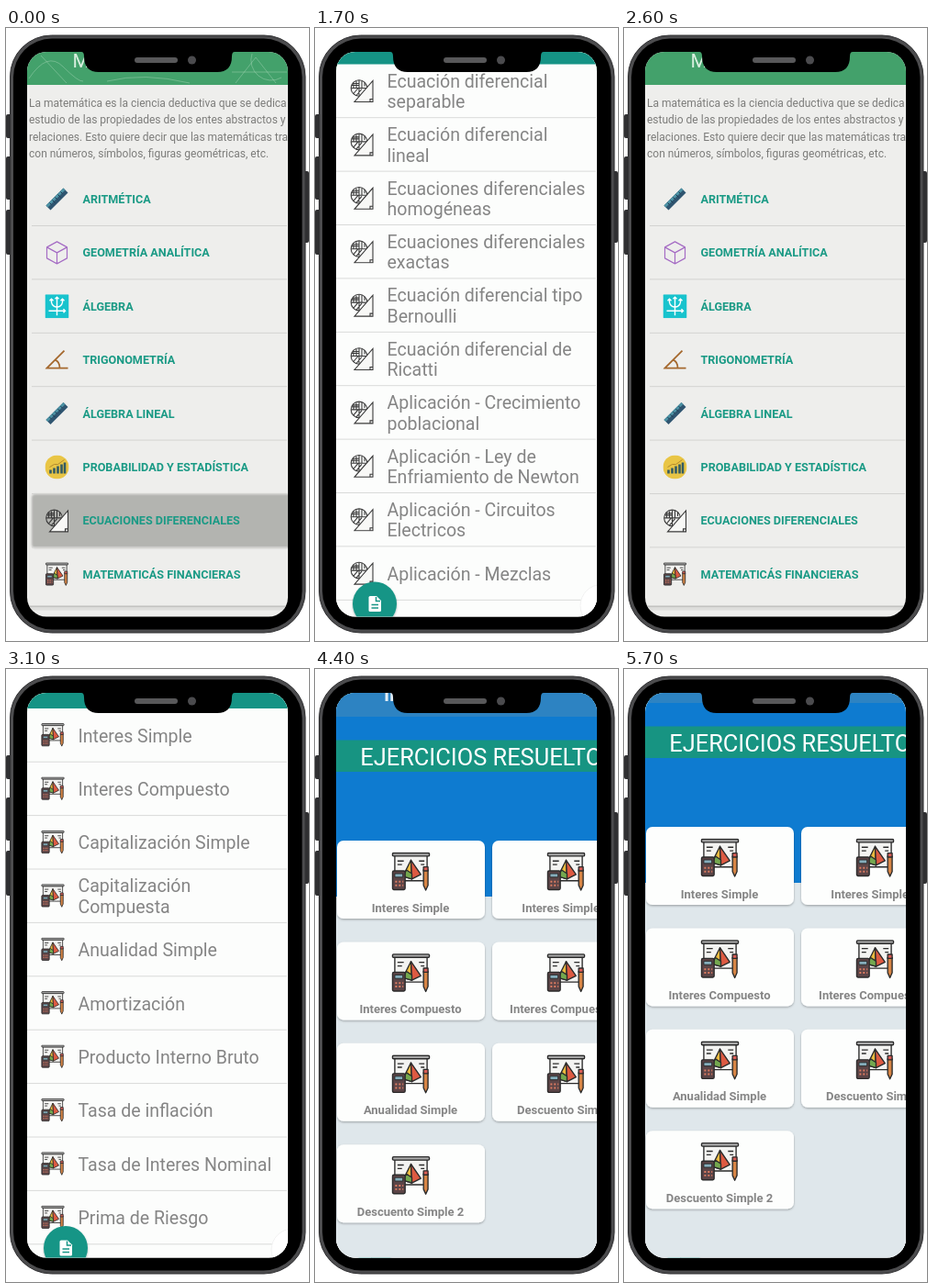
Animation of 330 by 668 pixels, one loop 5.9 s. Source, as an HTML page:

```html
<!DOCTYPE html>
<html lang="es">
<head>
<meta charset="utf-8">
<title>Matemáticas</title>
<style>
  html, body { margin: 0; width: 100%; height: 100%; overflow: hidden; background: #fff; }
  svg { display: block; }
  svg text { font-family: Roboto, Arial, sans-serif; }
  .intro { font-size: 12px; fill: #7c7c7a; }
  .topic { font-size: 12.6px; font-weight: 700; fill: #1a9a85; }
  .item { font-size: 19.55px; fill: #858585; }
  .label { font-size: 13px; font-weight: 700; fill: #858585; text-anchor: middle; }
  .title { font-size: 21px; }
  .banner { font-size: 25.4px; fill: #fff; }
</style>
</head>
<body>
<svg width="330" height="668" viewBox="0 0 330 668">
  <defs>
    <clipPath id="screen">
      <rect x="23" y="26" width="284" height="615.500" rx="21"/>
    </clipPath>
    <filter id="soft" x="-20%" y="-20%" width="140%" height="150%">
      <feDropShadow dx="0" dy="1.2" stdDeviation="1.2" flood-color="#000" flood-opacity=".3"/>
    </filter>
    <filter id="blur"><feGaussianBlur stdDeviation="1.2"/></filter>

    <symbol id="ruler" viewBox="0 0 26 26">
      <path d="M1 20L20 1L25 6L6 25Z" fill="#2f5570"/>
      <path d="M1 20L20 1L22 3L3 22Z" fill="#4d93a5"/>
      <path d="M5 17l2 2M8 14l3 3M11 11l2 2M14 8l3 3M17 5l2 2" stroke="#1c3850"/>
    </symbol>
    <symbol id="cube" viewBox="0 0 26 26">
      <path d="M13 1L24 7V19L13 25L2 19V7ZM2 7L13 13L24 7M13 13V25" fill="none" stroke="#a56cc4" stroke-width="1.2" stroke-linejoin="round"/>
    </symbol>
    <symbol id="axes" viewBox="0 0 26 26">
      <rect width="26" height="26" rx="1" fill="#18c3cd"/>
      <path d="M13 3V23M4 18H22M7 5Q6 13 13 14Q20 13 19 5M11 5L13 3L15 5M20 16L22 18L20 20M5 7L7 5L9 7M17 7L19 5L21 7" fill="none" stroke="#fff" stroke-width="1.4"/>
    </symbol>
    <symbol id="angle" viewBox="0 0 26 26">
      <path d="M21 3L2 22H25M11 13Q16 15 16 22" fill="none" stroke="#a5692f" stroke-width="1.8"/>
    </symbol>
    <symbol id="stats" viewBox="0 0 26 26">
      <circle cx="13" cy="13" r="13" fill="#e9c545"/>
      <path d="M6 20V16M10 20V14M14 20V12M18 20V10M21.5 20V8" stroke="#345b62" stroke-width="2.6"/>
      <path d="M5 13L10 10L14 10L21 5" fill="none" stroke="#b48b2d"/>
    </symbol>
    <symbol id="geo" viewBox="0 0 26 26">
      <g fill="none" stroke="#3a3a3a" stroke-width="1.1">
        <circle cx="10" cy="10" r="8.8"/>
        <path d="M1.500 10H18M10 1.500V18M4 4.500V10M7 2.500V10M2 7H10M3 5H10M13 2V10M16 4V8M4 16L9 10M7 18L13 11"/>
        <path d="M25 2V25H5Z" fill="#f8f8f6"/>
        <path d="M22 25V22H25"/>
      </g>
    </symbol>
    <symbol id="board" viewBox="0 0 44 44">
      <g stroke="#2b2b2b" stroke-width="1.4" stroke-linejoin="round">
        <path d="M4 4H40V32H4Z" fill="#f3f3f1"/>
        <rect x="1.500" y="1" width="41" height="3.500" rx="1" fill="#a9a9a9"/>
        <path d="M22 9L13 27L23 30Z" fill="#e9b93f"/>
        <path d="M22 9L23 30L33 25Z" fill="#dd5a42"/>
        <path d="M17 20L23 24L23 30L13 27Z" fill="#74a84f"/>
        <path d="M7 10h7M7 14h5M31 10h6M33 14h4" fill="none"/>
        <rect x="1.500" y="21" width="14" height="21" rx="1.500" fill="#5c4547"/>
        <rect x="4" y="24" width="9" height="4" fill="#85aebc" stroke-width="1"/>
        <path d="M36 20H41V37L38.500 42.500L36 37Z" fill="#d78545"/>
        <path d="M36 21V16.500H41V21Z" fill="#d95d56"/>
      </g>
      <path d="M4.500 33h2m2 0h2m2 0h1M4.500 37h2m2 0h2m2 0h1" stroke="#dd7c62" stroke-width="2"/>
    </symbol>
    <g id="fab">
      <circle cx="312" cy="627" r="23" fill="#fff" stroke="#f1f1f1"/>
      <circle cx="65" cy="625" r="24" fill="#179586" filter="url(#soft)"/>
      <path d="M60 616.500H67L72 621.500V632Q72 633.500 70.500 633.500H60Q58.500 633.500 58.500 632V618Q58.500 616.500 60 616.500Z" fill="#fff"/>
      <path d="M66.500 617.500V622H71M61.500 626H69M61.500 629.500H69" fill="none" stroke="#179586" stroke-width="1.5"/>
    </g>
  </defs>

  <g fill="#303032">
    <rect y="94" width="8" height="26" rx="2"/>
    <rect y="140" width="8" height="47" rx="2"/>
    <rect y="198" width="8" height="49" rx="2"/>
    <rect x="322" y="156" width="8" height="78" rx="2"/>
  </g>
  <rect x="4.500" y="8" width="321.500" height="651" rx="45" fill="#4c4c4e" stroke="#2e2e30"/>
  <rect x="8" y="11.500" width="314.500" height="644" rx="42"/>

  <g clip-path="url(#screen)">
    <g id="home">
      <rect width="330" height="668" fill="#eeeeec"/>
      <rect width="330" height="62" fill="#43a16b"/>
      <path id="doodles" d="M25 55Q45 25 62 42T84 58M38 30L66 60M250 60L272 32L294 60M246 48H306M268 28A22 22 0 0 0 300 54M110 58Q150 48 200 60" fill="none" stroke="#b4dcc0" stroke-opacity=".4"/>
      <text class="title" x="72.500" y="43" fill="#d9efdf">Matemáticas</text>
      <rect id="press" x="28" width="300" height="58.400" rx="4" fill="#b3b4b0" filter="url(#blur)"/>
    </g>
    <g id="equations"></g>
    <g id="finance"></g>
    <g id="exercises">
      <rect y="-60" width="330" height="740" fill="#dfe7eb"/>
      <rect y="-60" width="330" height="293" fill="#0e7bd0"/>
      <rect y="-60" width="330" height="97" fill="#2d83c2"/>
      <text class="title" x="75" y="19.500" fill="#e4eef6" font-weight="700">Inicio</text>
      <rect y="62.500" width="330" height="34.500" fill="#179482"/>
      <text class="banner" x="49.300" y="89.500">EJERCICIOS RESUELTOS</text>
    </g>
  </g>

  <path d="M82 20V26Q85 26 85 31Q85 48 101 48H230Q246 48 246 31Q246 26 249 26V20Z"/>
  <rect x="140" y="32" width="47" height="6" rx="3" fill="#58585a"/>
  <circle cx="202.500" cy="35" r="4.500" fill="#4b4b4e"/>
</svg>
<script>
const LOOP = 5900, STEP = 100, PITCH = 58.4;
const $ = id => document.getElementById(id);
const add = (id, markup) => $(id).insertAdjacentHTML('beforeend', markup);

const text = (cls, x, y, s) => `<text class="${cls}" x="${x}" y="${y}">${s}</text>`;
const icon = (name, cx, cy, size) =>
  `<use href="#${name}" x="${cx - size / 2}" y="${cy - size / 2}" width="${size}" height="${size}"/>`;
const rule = (x, y, color) => `<path d="M${x} ${y}H306" stroke="${color}"/>`;

const intro = [
  'La matemática es la ciencia deductiva que se dedica al',
  'estudio de las propiedades de los entes abstractos y sus',
  'relaciones. Esto quiere decir que las matemáticas trabajan',
  'con números, símbolos, figuras geométricas, etc.'
];
const topics = [
  ['ruler', 'ARITMÉTICA'], ['cube', 'GEOMETRÍA ANALÍTICA'], ['axes', 'ÁLGEBRA'],
  ['angle', 'TRIGONOMETRÍA'], ['ruler', 'ÁLGEBRA LINEAL'],
  ['stats', 'PROBABILIDAD Y ESTADÍSTICA'], ['geo', 'ECUACIONES DIFERENCIALES'],
  ['board', 'MATEMATICÁS FINANCIERAS']
];
const equations = [
  'Ecuación diferencial|separable', 'Ecuación diferencial|lineal',
  'Ecuaciones diferenciales|homogéneas', 'Ecuaciones diferenciales|exactas',
  'Ecuación diferencial tipo|Bernoulli', 'Ecuación diferencial de|Ricatti',
  'Aplicación - Crecimiento|poblacional', 'Aplicación - Ley de|Enfriamiento de Newton',
  'Aplicación - Circuitos|Electricos', 'Aplicación - Mezclas'
];
const finance = [
  'Interes Simple', 'Interes Compuesto', 'Capitalización Simple', 'Capitalización|Compuesta',
  'Anualidad Simple', 'Amortización', 'Producto Interno Bruto', 'Tasa de inflación',
  'Tasa de Interes Nominal', 'Prima de Riesgo', ''
];
const cards = [
  ['Interes Simple', 'Interes Simple 2'], ['Interes Compuesto', 'Interes Compuesto 2'],
  ['Anualidad Simple', 'Descuento Simple'], ['Descuento Simple 2']
];

intro.forEach((s, i) => add('home', text('intro', 25, 86 + i * 18.4, s)));
topics.forEach(([name, s], i) => {
  const y = 186.5 + i * PITCH;
  add('home', icon(name, 55.5, y, 26) + text('topic', 83.5, y + 4.5, s));
  if (i < 7) add('home', rule(28, y + 29, '#d3d3d1'));
});
add('home', '<path d="M23 630.5H307" stroke="#c2c2c0" stroke-width="2"/><path d="M23 633H307" stroke="#dededc" stroke-width="3"/>');

function buildList(id, rows, name) {
  add(id, '<rect y="-60" width="330" height="740" fill="#fcfdfc"/><rect y="-60" width="330" height="97" fill="#159385"/>');
  rows.forEach((row, i) => {
    const y = 66 + i * PITCH, lines = row.split('|');
    const top = y + 7.5 - (lines.length - 1) * 11.25;
    add(id, icon(name, 51, y, 26) + rule(23, y + 29.2, '#d9dad9'));
    lines.forEach((s, n) => add(id, text('item', 78.5, top + n * 22.5, s)));
  });
  add(id, '<use href="#fab"/>');
}
buildList('equations', equations, 'geo');
buildList('finance', finance, 'board');

cards.forEach((row, r) => row.forEach((s, c) => {
  const x = 24 + c * 169, y = 172 + r * 110.4, mid = x + 80;
  add('exercises', `<rect x="${x}" y="${y}" width="161" height="85" rx="7" fill="#fdfefd" filter="url(#soft)"/>`
    + icon('board', mid + 0.5, y + 34, 43) + text('label', mid, y + 77.5, s));
}));

// Each key: time, vertical offset, opacity; a pose holds until the next key.
const pages = {
  equations: [[0, 0, 0], [100, 42, .3], [200, 18, .85], [300, 6, 1], [400, 1.5, 1], [500, 0, 1],
    [1700, 2.5, 1], [1800, 9, .85], [1900, 26, .4], [2000, 0, 0]],
  finance: [[0, 0, 0], [2900, 40, .35], [3000, 17, .87], [3100, 6, 1], [3200, 1.5, 1], [3300, 0, 1]],
  exercises: [[0, 0, 0], [4200, 45, .2], [4300, 30, .75], [4400, 15, 1], [4500, 8, 1],
    [4600, 4, 1], [4700, 2, 1], [4800, 1, 1], [4900, 0, 1]]
};
const press = [[0, 508, 1], [500, 508, 0], [2700, 567, .4], [2800, 567, 1], [3200, 567, 0]];
const poseAt = (keys, t) => keys.findLast(k => k[0] <= t);

function draw(now) {
  const t = Math.floor(now % LOOP / STEP) * STEP;
  for (const id in pages) {
    const [, y, alpha] = poseAt(pages[id], t);
    $(id).setAttribute('transform', `translate(0 ${y})`);
    $(id).setAttribute('opacity', alpha);
    $(id).setAttribute('visibility', alpha ? 'visible' : 'hidden');
  }
  const [, y, alpha] = poseAt(press, t);
  $('press').setAttribute('y', y);
  $('press').setAttribute('opacity', alpha);
  $('doodles').setAttribute('opacity', t < 1700 ? 1 : 0);
}

const start = performance.now();
function tick() {
  draw(performance.now() - start);
  requestAnimationFrame(tick);
}
tick();
</script>
</body>
</html>
```
